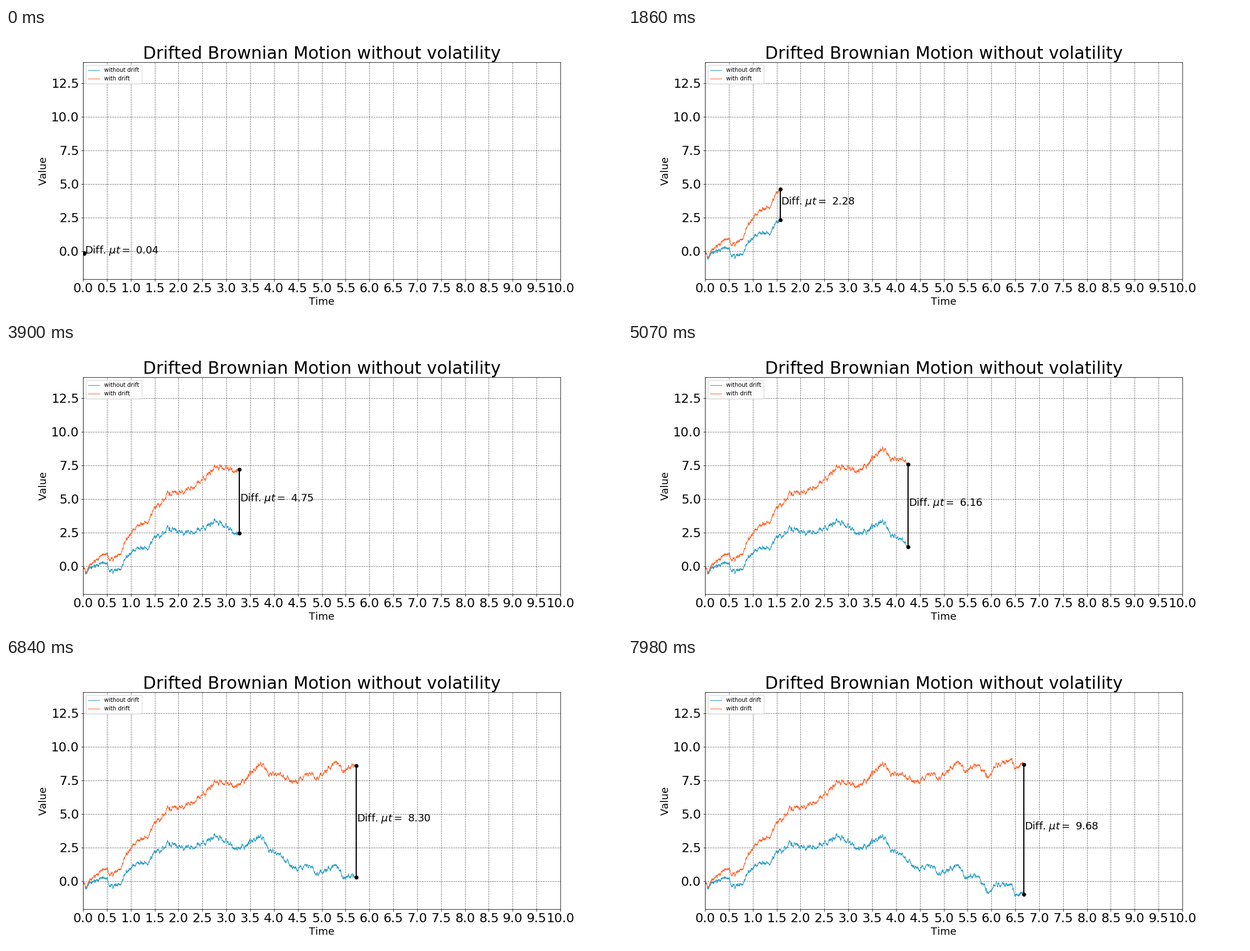
Write a matplotlib script that moves like this. It is 1080 px wide and 504 px high and loops after 8 s.

```python
import numpy as np
import matplotlib.pyplot as plt
from matplotlib.animation import FuncAnimation

LOOP_MS = 8000
FRAMES = 267
STEP = 0.025      # time advanced per frame
FINE = 10         # path samples per frame
MU = 1.45
LAG = 5           # samples by which the lines trail the marker
REVERT = 0.02     # time in which the jitter falls back to the trend
BLUE, ORANGE = "#2e9fc5", "#ff662e"

# Main turns of the driftless path: pixels right of and above the origin
TURNS = [
    (0, 0), (5, -7), (36, 10), (46, -4), (65, -7), (76, 17), (97, 36),
    (114, 34), (128, 56), (134, 50), (149, 67), (193, 57), (231, 80),
    (252, 71), (268, 54), (311, 80), (326, 54), (339, 52), (356, 39),
    (368, 23), (398, 26), (409, 13), (444, 28), (455, 9), (480, 9),
    (497, -22), (507, -6), (536, -5), (543, -23), (559, -24),
]


def make_path():
    """Trend through the turns plus mean-reverting Brownian jitter."""
    dt = STEP / FINE
    t = np.arange(FRAMES * FINE + 1) * dt
    x, y = np.transpose(TURNS)
    kicks = np.random.default_rng(7).normal(0, np.sqrt(dt), t.size)
    jitter = np.zeros(t.size)
    for i in range(1, t.size):
        jitter[i] = jitter[i - 1] * (1 - dt / REVERT) + kicks[i]
    return t, np.interp(t, x / 83.7, y / 23.6) + jitter


time, plain = make_path()
drifted = plain + MU * time

plt.rcParams["text.kerning_factor"] = 6
fig, ax = plt.subplots(figsize=(15, 7), dpi=72)
fig.subplots_adjust(left=0.125, right=0.9, bottom=0.125, top=0.88)
ax.set_xlim(0, 10)
ax.set_ylim(-2.06, 14.06)
ax.set_xticks(np.arange(0, 10.5, 0.5))
ax.set_yticks(np.arange(0, 13, 2.5))
ax.tick_params(labelsize=22)
ax.grid(color="black", linestyle="--", linewidth=0.8, alpha=0.6)
ax.set_title("Drifted Brownian Motion without volatility", fontsize=30)
ax.set_xlabel("Time", fontsize=18)
ax.set_ylabel("Value", fontsize=18)

plain_line, = ax.plot([], [], color=BLUE, lw=1, label="without drift")
drift_line, = ax.plot([], [], color=ORANGE, lw=1, label="with drift")
gap_line, = ax.plot([], [], "ko-", lw=2, ms=6)
label = ax.text(0, 0, "", fontsize=18)
ax.legend(loc="upper left", fontsize=10)


def update(frame):
    now = (frame + 1) * FINE
    shown = slice(0, now - LAG + 1)
    plain_line.set_data(time[shown], plain[shown])
    drift_line.set_data(time[shown], drifted[shown])
    t, low, high = time[now], plain[now], drifted[now]
    gap_line.set_data([t, t], [low, high])
    label.set_position((t + 0.01, (low + high) / 2))
    label.set_text(rf"Diff. $\mu t =$ {MU * t:.2f}")
    return plain_line, drift_line, gap_line, label


anim = FuncAnimation(fig, update, frames=FRAMES, interval=LOOP_MS / FRAMES,
                     repeat=True, repeat_delay=0)
plt.show()
```
